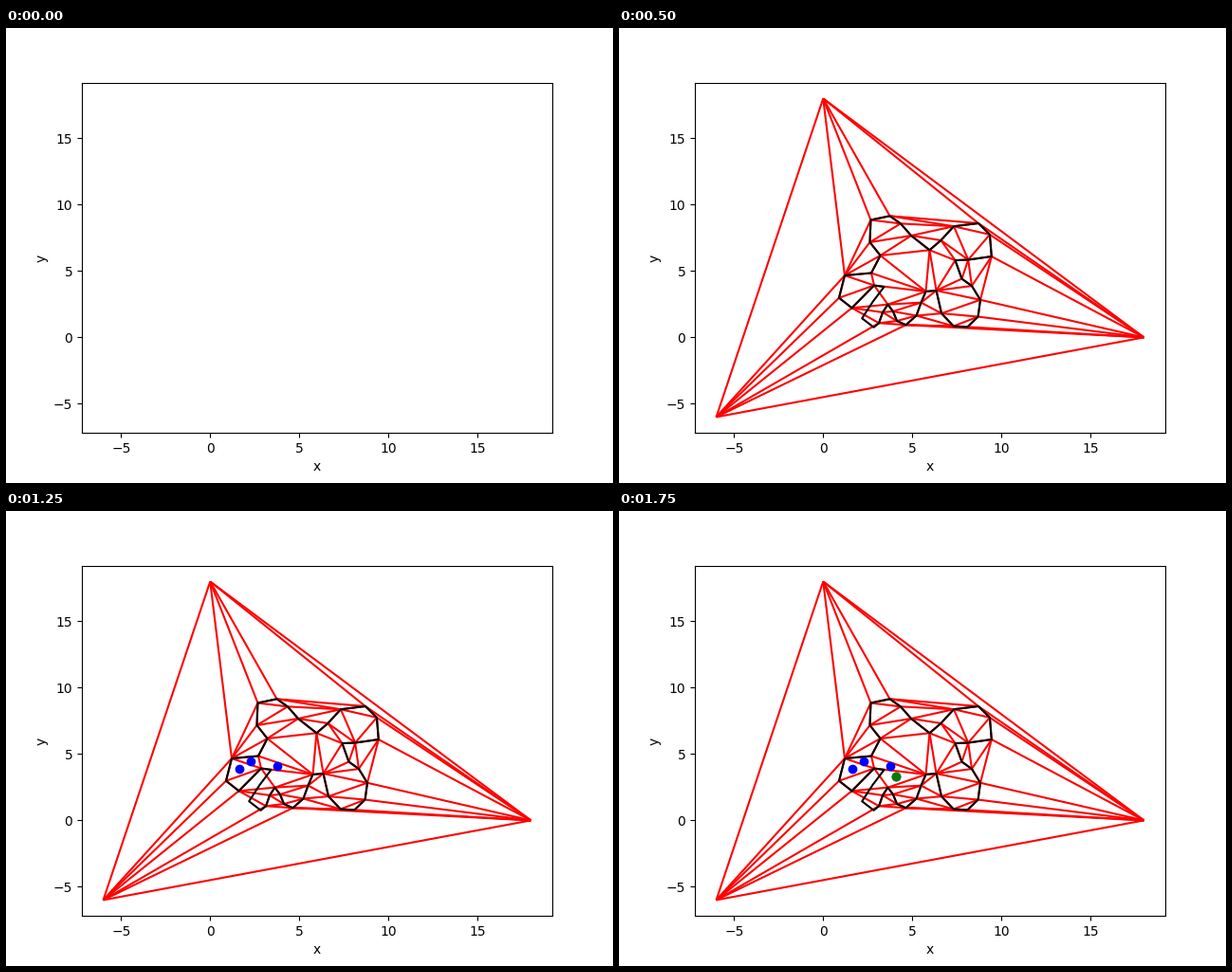
A matplotlib script for the animation above (2000 ms loop, 640 by 480 pixels).

```python
import matplotlib.pyplot as plt
import numpy as np
from matplotlib.animation import FuncAnimation
from matplotlib.collections import LineCollection
from matplotlib.tri import Triangulation

# key corners of the blob; long sides get one more vertex from smooth()
CORNERS = np.array([
    (1.61, 2.22), (0.89, 2.98), (1.21, 4.67), (2.70, 4.85), (3.21, 6.17),
    (2.62, 7.17), (2.67, 8.85), (3.74, 9.15), (4.94, 7.67), (5.97, 6.58),
    (7.33, 8.37), (8.71, 8.60), (9.35, 7.75), (9.45, 6.10), (8.14, 5.85),
    (7.41, 5.81), (7.78, 4.42), (8.34, 3.88), (8.82, 2.83), (8.10, 0.79),
    (6.64, 1.81), (6.35, 3.53), (5.76, 3.46), (5.23, 1.64), (4.64, 0.94),
    (4.14, 1.24), (3.92, 1.96), (3.63, 2.48), (3.34, 1.89), (3.13, 1.08),
    (2.84, 0.76), (2.18, 1.44), (3.42, 3.81), (2.86, 3.92),
])
LEFT, RIGHT, TOP = (-6, -6), (18, 0), (0, 18)
FAR_LEFT = (-24, 2)  # stands in for LEFT while triangulating


def smooth(keys, longest=1.76, bulge=0.12):
    """Split long sides with a vertex that follows the curve of the outline."""
    path = [keys[0]]
    for i in range(1, len(keys)):
        a, b = keys[i - 1], keys[i]
        if np.hypot(*(b - a)) > longest:
            outer = keys[i - 2] + keys[(i + 1) % len(keys)]
            path.append((a + b) / 2 + bulge * (a + b - outer))
        path.append(b)
    return np.array(path)


def mesh_segments(points):
    """Delaunay edges of the points inside the big triangle."""
    tri = Triangulation(*np.vstack([points, FAR_LEFT, RIGHT, TOP]).T)
    return np.vstack([points, LEFT, RIGHT, TOP])[tri.edges]


outline = smooth(CORNERS)
hub = outline[-1]
inserted = np.vstack([outline[:35], hub])

# the walk crosses neighbouring triangles around the hub
fan = outline[[1, 2, 3, 26, 32]]
walk = (fan[:-1] + fan[1:] + hub) / 3

fig, ax = plt.subplots(figsize=(6.4, 4.8), dpi=100)
ax.set(xlim=(-7.2, 19.2), ylim=(-7.2, 19.2), xlabel="x", ylabel="y")

border, = ax.plot(*np.vstack([outline, outline[:1]]).T, "k-", zorder=3)
mesh = LineCollection(mesh_segments(inserted), colors="r", linewidths=1.5,
                      capstyle="butt", zorder=2)
ax.add_collection(mesh, autolim=False)
dots = [ax.plot(x, y, "bo", zorder=4)[0] for x, y in walk]
found, = ax.plot(*walk[-1], "go", zorder=5)

stages = [border, mesh, *dots, found]


def draw(i):
    for start, artist in enumerate(stages, 1):
        artist.set_visible(i >= start)
    return stages


anim = FuncAnimation(fig, draw, frames=len(stages) + 1, interval=250,
                     repeat=True, repeat_delay=0)
plt.show()
```
